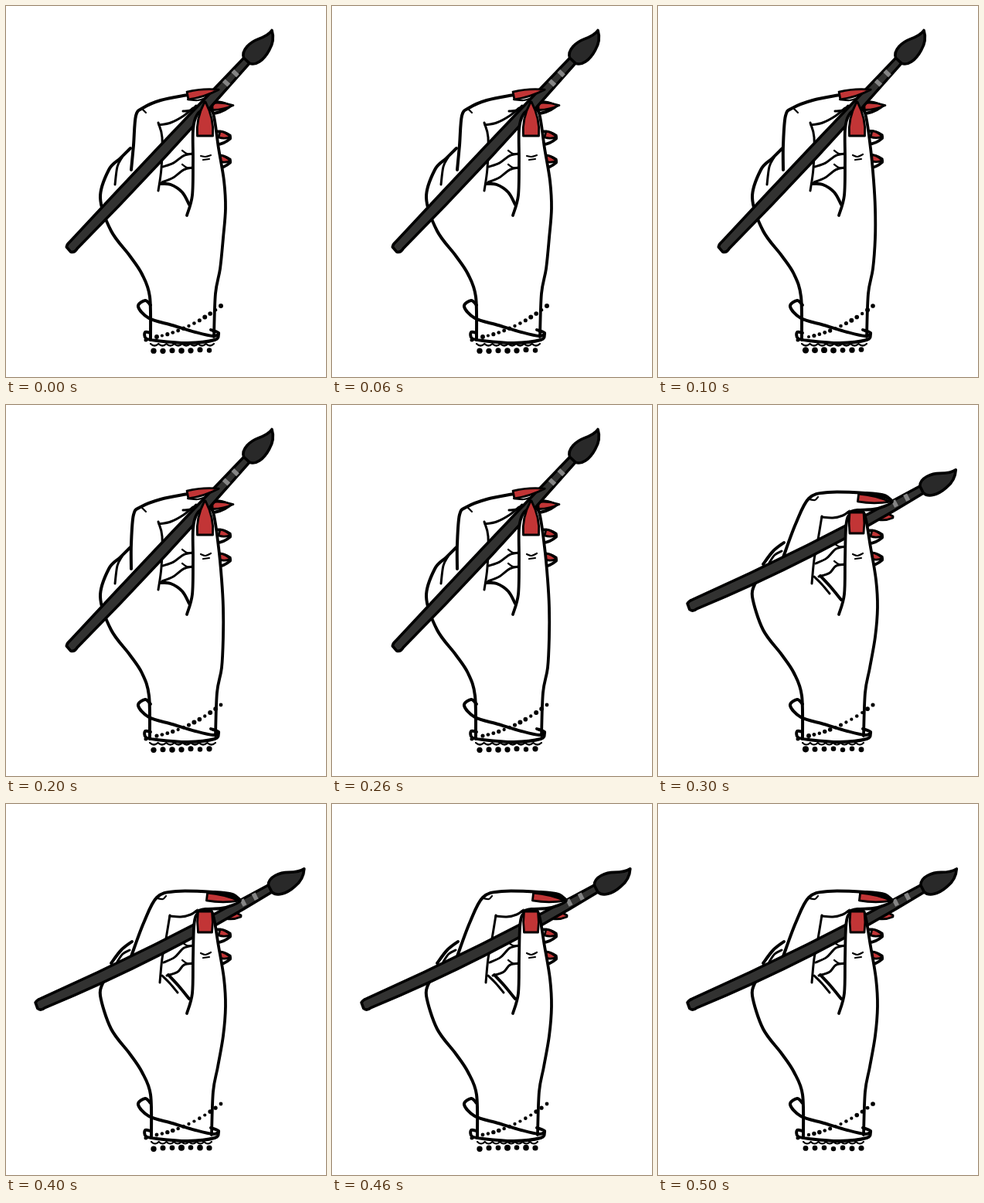
Write an HTML page that moves like this. It is 414x480 px and loops after 0.6 s.

```html
<!DOCTYPE html>
<html lang="en">
<head>
<meta charset="utf-8">
<title>Hand with paintbrush</title>
<style>
  html, body { margin: 0; width: 100%; height: 100%; overflow: hidden; background: #fff; }
  svg { display: block; width: 100vw; height: 100vh; }
  path { fill: none; stroke: #000; stroke-width: 3; stroke-linecap: round; stroke-linejoin: round; }
  .edge { stroke-width: 4; }
  .thin { stroke-width: 2.2; }
  .skin { fill: #fff; stroke-width: 3.8; }
  .nail { fill: #c23536; stroke-width: 2.8; }
  .wood { fill: #323231; stroke-width: 3.6; }
  .hair { fill: #292929; stroke-width: 3.6; }
  .band { stroke: #858585; stroke-width: 5.5; stroke-linecap: butt; }
  .pose { visibility: hidden; animation: show 600ms step-end infinite; }
  @keyframes show {
    0% { visibility: visible; }
    16.6667%, 100% { visibility: hidden; }
  }
</style>
</head>
<body>
<svg id="stage" viewBox="0 0 414 480"></svg>
<script>
const path = (d, cls = '') => `<path class="${cls}" d="${d}"/>`;
const repeat = (n, make) => Array.from({ length: n }, (_, i) => make(i)).join('');

function seeded(seed) {
  return () => {
    const v = Math.sin(++seed * 12.9898) * 43758.5453;
    return v - Math.floor(v);
  };
}

// Smooth line through a few key points.
function line(text, cls) {
  const pts = text.trim().split(/\s+/).map(p => p.split(',').map(Number));
  const at = i => pts[Math.max(0, Math.min(pts.length - 1, i))];
  let d = 'M' + pts[0];
  for (let i = 0; i < pts.length - 1; i++) {
    const [a, b, c, e] = [at(i - 1), at(i), at(i + 1), at(i + 2)];
    const p = b.map((v, k) => v + (c[k] - a[k]) / 6);
    const q = c.map((v, k) => v - (e[k] - b[k]) / 6);
    d += `C${p} ${q} ${c}`;
  }
  return path(d, cls);
}

// Leaf with a flat base at x,y; tip is half the width of its far end.
function leaf(x, y, len, w, angle, tip = 0, cls = 'nail') {
  const side = s => `${len * 0.5},${s * w * 0.6}`;
  return `<g transform="translate(${x} ${y}) rotate(${angle})">` + path(
    `M0,${-w / 2} Q${side(-1)} ${len},${-tip} V${tip} Q${side(1)} 0,${w / 2}Z`, cls) + '</g>';
}

const fingertip = (x, y) =>
  leaf(x - 4, y + 3, 20, 16, -4, 2, 'skin') + leaf(x + 2, y - 2, 15, 8, 14);

// Edge of a curled finger seen between brush and thumb.
const fold = (x, y, rise) =>
  line(`${x},${y} ${x + 14},${y - rise * 0.3} 230,${y - rise * 0.85} 242,${y - rise}`) +
  line(`228,${y - rise - 4} 234,${y - rise} 242,${y - rise + 1}`, 'thin');

function brush(x, y, endX, endY, bend) {
  const dx = endX - x, dy = endY - y;
  const len = Math.hypot(dx, dy), turn = Math.atan2(dy, dx) * 180 / Math.PI;
  const handle = `M-3,-5 Q0,-7 5,-6.5 Q${len / 2},${2 * bend - 9} ${len},-5
    V5 Q${len / 2},${2 * bend + 9} 5,6.5 Q-2,8 -4,3Z`;
  const tuft = `M${len - 1},-5 c5,-10 21,-8 31,-3 c8,4 14,6 20,5
    c-4,7 -12,13 -21,15 c-15,4 -27,1 -30,-7Z`;
  const band = off => path(`M${len - off},-4 v9`, 'band');
  return `<g transform="translate(${x} ${y}) rotate(${turn})">` +
    path(handle, 'wood') + band(23) + band(40) + path(tuft, 'hair') + '</g>';
}

function palm(start, left) {
  return line(`${start} 122,248 136,291 160,323 176,347 ${left - 1},376 ${left},432`, 'edge');
}

function thumb(top, right, bulge) {
  return line(`234,271 241,245 242,200 ${top} 275,184 ${280 + bulge},226 ${282 + bulge},262
    281,300 ${right + 8},340 ${right + 2},372 ${right},428`, 'skin');
}

const crease = lift =>
  line(`252,${194 - lift} 258,195 265,${193 - lift}`, 'thin') + line('255,199 263,198', 'thin');

function jewellery(left, right, rand) {
  const wide = right - left;
  const bead = i => {
    const t = i / 12, x = 195 + 83 * t, y = 428 - 16 * t - 24 * t * t;
    return `<circle cx="${x}" cy="${y}" r="${2 + rand()}"/>`;
  };
  const pearl = i => `<circle cx="${191 + i * 12}" cy="${444.5 + 2 * rand()}" r="${3.2 + rand()}"/>`;
  return line(`187,387 180,381 171,389 185,404 215,413 245,422 268,427 275,423 265,419`, 'edge') +
    line('187,423 180,422 181,430 195,433 235,436 270,432 275,425', 'edge') +
    path(`M${left},437` + repeat(8, () => `q${wide / 16},5 ${wide / 8},0`), 'thin') +
    repeat(13, bead) + repeat(7, pearl) + '<circle cx="181" cy="432" r="2.5"/>';
}

// k counts the three slightly different drawings of each pose.
function upright(k) {
  const knuckle = k ? 165 : 168, left = k ? 186 : 187;
  return palm('161,184 148,197 133,212', left) +
    line('150,196 144,208 141,231') +
    line(`235,115 200,122 ${knuckle + 9},132 ${knuckle},142 ${knuckle - 3},180 162,212`, 'edge') +
    line('176,133 181,138', 'thin') +
    line('197,151 202,170 201,210 197,239') +
    line('198,154 213,151 230,142 242,132') +
    line('229,136 239,135 246,129') +
    fold(203, 208, 17) + fold(202, 228, 19) +
    line('200,230 213,231 228,241 237,257', 'edge') +
    fingertip(274, 168 - k / 2) + fingertip(274, 199 - k / 2) +
    leaf(264, 132, 25, 14, -6, 1, 'skin') + leaf(267, 130, 27, 9, -3) +
    brush(84, 313, 312, 70, 1) +
    leaf(235, 116, 41, 10, -11) + line('235,121 248,122 258,119', 'thin') +
    thumb('242,160 247,141 258,134 268,139', 269 + k, k ? -1 : 2) +
    leaf(257.5, 168, 44, 20, -90, 0.5) + crease(k && 1) +
    jewellery(left, 269 + k, seeded(k));
}

function tilted(k) {
  const left = k ? 188 : 187;
  return palm('126,230', left) +
    line('136,206 149,189 163,178', 'edge') + line('144,204 151,194 160,189') +
    line('303,125 293,117 270,114 220,113 195,121 178,154 162,197', 'edge') +
    line('196,122 203,123 207,119', 'thin') +
    line('212,144 207,174 202,200 199,231') +
    line('212,145 226,146 239,143 248,137') +
    fold(204, 205, 22) + fold(208, 222, 16) +
    line('202,222 212,232 222,244') + line('210,221 223,235 237,252', 'edge') +
    fingertip(274, 168) + fingertip(274, 197) +
    leaf(286, 144, 18, 9, 3, 1) +
    brush(43, 260, 342 + k / 2, 109, 5) +
    line('246,139 258,136 278,135 293,131 303,125 292,119 262,116', 'skin') +
    leaf(259 + k, 120, 42, 10, 7) +
    thumb('243,160 246,144 256,138 267,141', 266, 2) +
    leaf(257 + k / 2, 166, 27, 18, -90, 9) + crease(1) +
    jewellery(left, 266, seeded(k + 40));
}

const poses = [0, 1, 2].map(upright).concat([0, 1, 2].map(tilted));
document.getElementById('stage').innerHTML = poses.map((art, i) =>
  `<g class="pose" style="animation-delay:${i ? i * 100 - 600 : 0}ms">${art}</g>`).join('');
</script>
</body>
</html>
```
